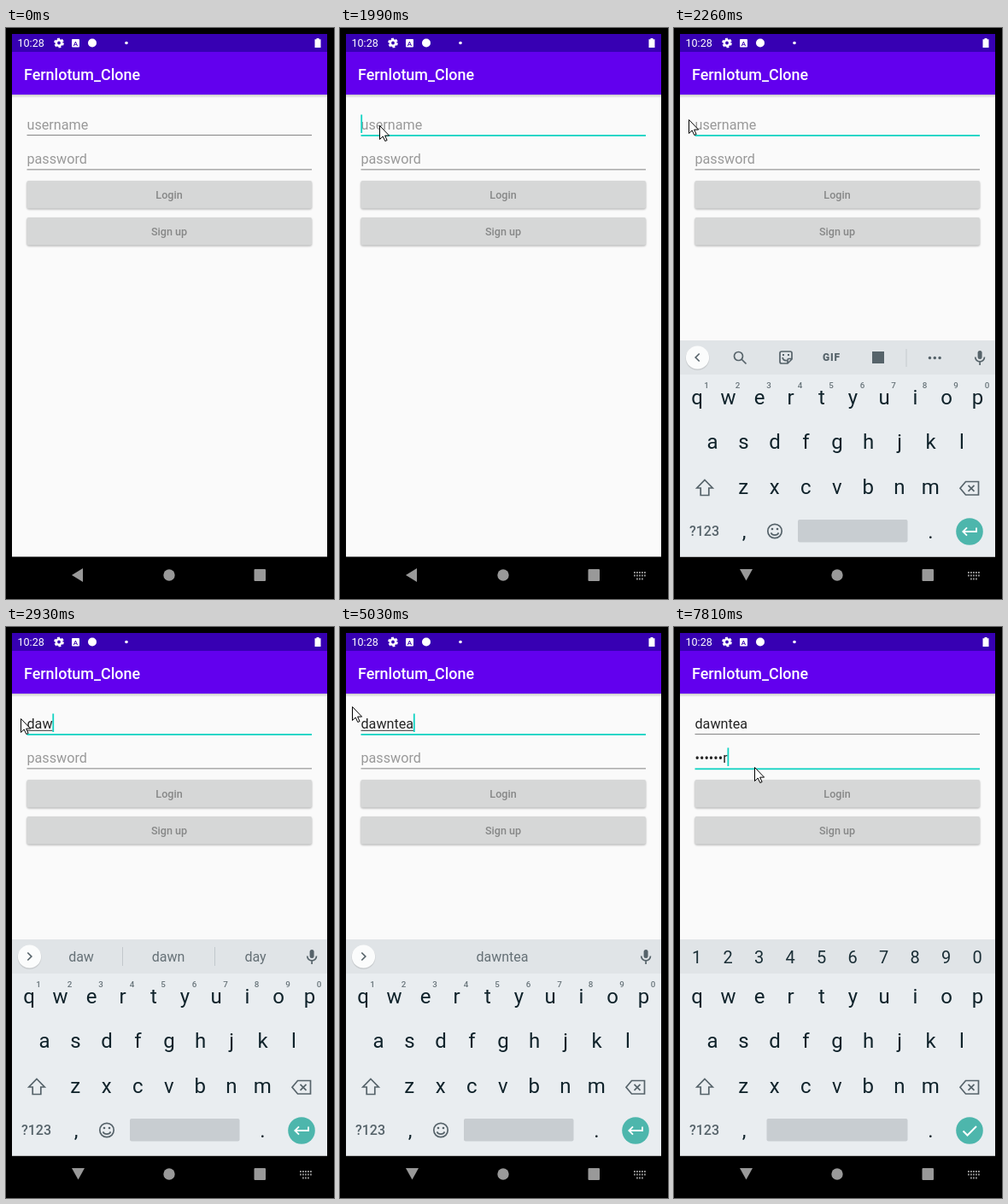
An HTML page that plays this animation: 384x669 px, repeating every 8 s.

```html
<!DOCTYPE html>
<html lang="en">
<head>
<meta charset="utf-8">
<title>Login screen</title>
<style>
  html, body { margin: 0; width: 100%; height: 100%; overflow: hidden; background: #000; }
  svg { display: block; width: 100vw; height: 100vh; font-family: Roboto, sans-serif; }
  .mid { text-anchor: middle; }
  .medium { font-weight: 500; }
  .field { font-size: 16.16px; }
  .hint { fill: #999; }
  .typed { fill: #242424; }
  .button { font-size: 12.57px; fill: #868787; }
  .key { font-size: 24px; fill: #10232b; }
  .digit { font-size: 20px; fill: #1b2f37; }
  .sup { font-size: 9.8px; fill: #68747a; }
  .word { font-size: 16px; fill: #657076; }
  .icon { fill: #56636a; }
  .line { fill: none; stroke: #56636a; stroke-width: 1.7; }
  .nav { fill: #999; }
  .accent { fill: #12d3c3; }
</style>
</head>
<body>
<svg viewBox="0 0 384 669" preserveAspectRatio="none">
  <defs>
    <linearGradient id="shade" x2="0" y2="1">
      <stop stop-opacity=".2"/><stop offset="1" stop-opacity="0"/>
    </linearGradient>
    <filter id="soft" x="-5%" y="-20%" width="110%" height="150%"><feGaussianBlur stdDeviation="1"/></filter>
  </defs>
  <rect width="384" height="669"/>
  <rect x="7" y="7" width="369" height="612.5" fill="#fafafa"/>
  <rect x="7" y="78" width="369" height="4" fill="url(#shade)"/>
  <rect x="7" y="7" width="369" height="21" fill="#3700b3"/>
  <rect x="7" y="28" width="369" height="50" fill="#6200ee"/>

  <g id="status" fill="#fff">
    <text x="13.5" y="22" font-size="12.57">10:28</text>
    <circle cx="62" cy="17.5" r="3.2" fill="none" stroke="#fff" stroke-width="2.6"/>
    <circle cx="62" cy="17.5" r="4.9" fill="none" stroke="#fff" stroke-width="1.9" stroke-dasharray="2.9 2.23"/>
    <rect x="77" y="13" width="9" height="9.5" rx="1"/>
    <text class="mid medium" x="81.5" y="20.6" font-size="8" fill="#3700b3">A</text>
    <circle cx="101" cy="17.5" r="5"/>
    <circle cx="141" cy="17.5" r="1.8"/>
    <path d="M363.5 12h3v1.3h2v9.7h-7v-9.7h2z"/>
  </g>
  <text class="medium" x="21" y="60.5" font-size="17.95" fill="#fff">Fernlotum_Clone</text>

  <g id="fields"></g>
  <g id="buttons"></g>

  <g id="keyboard">
    <rect x="7" y="366" width="369" height="253.5" fill="#e9edf0"/>
    <rect x="7" y="366" width="369" height="40" fill="#e0e4e7"/>
    <g id="letters"></g>
    <path class="line" d="M36 529.5l9.2 9.5h-4.4v8.5h-9.6v-8.5h-4.4z"/>
    <path class="line" d="M341.5 531.5h15v15.5h-15l-6.5-7.75zM344.5 535.8l7 7m0-7l-7 7"/>
    <text class="mid medium icon" x="35.5" y="595" font-size="16">?123</text>
    <text class="mid key" x="82" y="598">,</text>
    <text class="mid key" x="300.5" y="598">.</text>
    <rect id="space" y="576" height="26.5" rx="2" fill="#c8cdd1"/>
    <circle cx="346" cy="590" r="15.8" fill="#4db6ac"/>
    <g id="plainKeys">
      <g id="sups"></g>
      <circle class="line" cx="118" cy="589.5" r="8.2"/>
      <path class="line" d="M113.5 591.3a4.8 4.2 0 0 0 9 0"/>
      <circle class="icon" cx="115" cy="587" r="1.3"/><circle class="icon" cx="121" cy="587" r="1.3"/>
      <path d="M354 585.5v4.5h-15.5m4.5-4.7l-4.7 4.7 4.7 4.7" fill="none" stroke="#fff" stroke-width="1.8"/>
      <circle cx="27.5" cy="387" r="14" fill="#000" opacity=".1"/>
      <circle cx="27.5" cy="386" r="13.6" fill="#fbfcfc"/>
      <path id="chevron" class="line"/>
      <rect class="icon" x="355.6" y="378" width="5" height="10" rx="2.5"/>
      <path class="line" stroke-width="1.4" d="M352.7 385.5a5.4 5.4 0 0 0 10.8 0M358.1 391v4"/>
    </g>
    <g id="tools">
      <circle class="line" cx="75.5" cy="384.5" r="5"/><path class="line" d="M79 388l5.5 5.5"/>
      <path class="line" d="M126 379h10q2 0 2 2v7l-5 5h-7q-2 0-2-2v-10q0-2 2-2zM138 387.5h-3.5q-1.5 0-1.5 1.5v4M127 386q1 4 5 3.5"/>
      <path class="icon" d="M127 382h2v2h-2zm6 0h2v2h-2z"/>
      <text class="mid icon" x="184.5" y="390.3" font-size="12" font-weight="900" letter-spacing=".8">GIF</text>
      <rect class="icon" x="232" y="379" width="14" height="14"/>
      <path d="M272 376v21" stroke="#c5cace"/>
      <path d="M299.5 386.5h12" stroke="#56636a" stroke-width="3.6" stroke-linecap="round" stroke-dasharray="0 5.8"/>
    </g>
    <g id="words">
      <path id="dividers" d="M136.5 375v22M244.5 375v22" stroke="#c2c8cc"/>
    </g>
    <g id="secretKeys">
      <g id="digits"></g>
      <path d="M338.5 590.5l5 5 10.5-10.5" fill="none" stroke="#fff" stroke-width="2"/>
    </g>
  </g>

  <g class="nav">
    <path id="back"/>
    <circle cx="191" cy="641" r="6.7"/>
    <rect x="290.5" y="634" width="13.5" height="14" rx="1"/>
    <path id="switcher" d="M344 638h14M344 641.5h14M347 645.5h8" stroke="#999" stroke-width="1.8" stroke-dasharray="1.8 1.2"/>
  </g>
  <path id="mouse" d="M.5.5v16l3.7-3.5 2.6 5.5 2.3-1-2.5-5.4h5z" fill="#fff" stroke="#000"/>
</svg>
<script>
const $ = id => document.getElementById(id);

function add(parent, tag, attrs, text = '') {
  const el = document.createElementNS('http://www.w3.org/2000/svg', tag);
  for (const name in attrs) el.setAttribute(name, attrs[name]);
  el.textContent = text;
  $(parent).append(el);
  return el;
}
const show = (el, on) => el.setAttribute('visibility', on ? 'inherit' : 'hidden');
const rowOf = (parent, chars, x, y, cls) => [...chars].forEach((c, i) =>
  add(parent, 'text', { class: 'mid ' + cls, x: x + i * 36.5, y }, c));

rowOf('letters', 'qwertyuiop', 27, 440.5, 'key');
rowOf('letters', 'asdfghjkl', 45, 493, 'key');
rowOf('letters', 'zxcvbnm', 81.3, 545.5, 'key');
rowOf('sups', '1234567890', 38, 422, 'sup medium');
rowOf('digits', '1234567890', 26.5, 394, 'digit');

['Login', 'Sign up'].forEach((label, i) => {
  const y = 179 + i * 43;
  const box = { x: 24.5, width: 333.5, height: 32.5, rx: 2 };
  add('buttons', 'rect', { ...box, y: y + 1, opacity: .3, filter: 'url(#soft)' });
  add('buttons', 'rect', { ...box, y, fill: '#d6d7d7' });
  add('buttons', 'text', { class: 'mid medium button', x: 191, y: y + 21 }, label);
});

function makeField(hintText, y, lineY) {
  const base = { x: 24.5, y };
  const bar = { x: 24.5, width: 333.5 };
  const hint = add('fields', 'text', { class: 'field hint', ...base }, hintText);
  const typed = add('fields', 'text', { class: 'field typed', ...base });
  const idle = add('fields', 'rect', { ...bar, y: lineY, height: .95, fill: '#7d7d7d' });
  const active = add('fields', 'rect', { ...bar, class: 'accent', y: lineY, height: 1.8 });
  const mark = add('fields', 'rect', { x: 24.5, y: y + 1.8, height: 1, fill: '#333' });
  const caret = add('fields', 'rect', { class: 'accent', y: y - 17.5, width: 1.8, height: 21.5 });
  return (text, focused, caretOn, composing) => {
    typed.textContent = text;
    const width = text ? typed.getComputedTextLength() : 0;
    show(hint, !text);
    show(idle, !focused);
    show(active, focused);
    show(caret, focused && caretOn);
    caret.setAttribute('x', 24.3 + width);
    mark.setAttribute('width', composing ? width : 0);
  };
}
const drawUser = makeField('username', 119, 125.1);
const drawPass = makeField('password', 159, 165.4);
const words = [88, 190, 292].map(x => add('words', 'text', { class: 'mid word', x, y: 392 }));

// Each step [ms, changes] adds to the state before it.
const typeUser = (user, ...sug) => ({ user, sug, caret: true });
const typePass = (count, last) => ({ pass: '•'.repeat(count) + last, caret: true });
const steps = [
  [0, { mouse: null, focus: '', caret: false, user: '', pass: '', sug: [], keys: '', switcher: false, composing: true }],
  [400, { mouse: [365, 303] }],
  [520, { mouse: [301, 241] }],
  [670, { mouse: [181, 150] }],
  [790, { mouse: [61, 73] }],
  [1040, { mouse: [42, 98] }],
  [1160, { mouse: [29, 118] }],
  [1440, { mouse: [46, 114] }],
  [1870, { focus: 'user', caret: true }],
  [1990, { switcher: true }],
  [2140, { keys: 'plain', mouse: [17, 107] }],
  [2260, { caret: false }],
  [2690, typeUser('d', 'd', 'do', 'day')],
  [2810, typeUser('da', 'da', 'day', 'dad')],
  [2930, typeUser('daw', 'daw', 'dawn', 'day')],
  [3470, { caret: false }],
  [3970, { caret: true }],
  [4220, typeUser('dawn', 'dawn', 'daws', 'daw')],
  [4370, typeUser('dawnt', 'dawnt', 'dawn', 'daunt')],
  [4490, typeUser('dawnte', 'dawnte', 'dawn', 'date')],
  [4640, typeUser('dawntea', '', 'dawntea', '')],
  [5030, { mouse: [14, 93] }],
  [5150, { mouse: [42, 105], caret: false }],
  [5300, { mouse: [94, 157] }],
  [5680, { focus: 'pass', caret: true, composing: false }],
  [5830, { keys: 'secret' }],
  [6080, { mouse: [94, 164] }],
  [6360, { caret: false }],
  [6760, typePass(1, 'e')],
  [6880, typePass(2, 'w')],
  [7420, typePass(3, 'n')],
  [7570, typePass(4, 's')],
  [7690, typePass(5, 'e')],
  [7810, typePass(6, 'r')]
];

function draw(s) {
  const plain = s.keys === 'plain', suggesting = s.sug.length > 0;
  drawUser(s.user, s.focus === 'user', s.caret, s.composing);
  drawPass(s.pass, s.focus === 'pass', s.caret, false);
  show($('keyboard'), s.keys);
  for (const [id, on] of Object.entries({
    plainKeys: plain, tools: plain && !suggesting, words: plain && suggesting,
    secretKeys: s.keys === 'secret', dividers: s.sug[0]
  })) $(id).style.display = on ? '' : 'none';
  words.forEach((el, i) => el.textContent = s.sug[i] || '');
  $('chevron').setAttribute('d', suggesting ? 'M25.3 381.5l4.5 4.5-4.5 4.5' : 'M29.7 381.5l-4.5 4.5 4.5 4.5');
  const spaceX = plain ? 145 : 108.5;
  $('space').setAttribute('x', spaceX);
  $('space').setAttribute('width', 273.5 - spaceX);
  $('back').setAttribute('d', s.keys ? 'M77 634h15l-7.5 13.5z' : 'M77 641l13-8v16z');
  show($('switcher'), s.switcher);
  show($('mouse'), s.mouse);
  if (s.mouse) $('mouse').setAttribute('transform', `translate(${s.mouse})`);
}

let current = -1;
function tick() {
  const t = performance.now() % 8000;
  const index = steps.filter(([at]) => at <= t).length - 1;
  if (index !== current) {
    current = index;
    draw(Object.assign({}, ...steps.slice(0, index + 1).map(step => step[1])));
  }
  requestAnimationFrame(tick);
}
tick();
</script>
</body>
</html>
```
